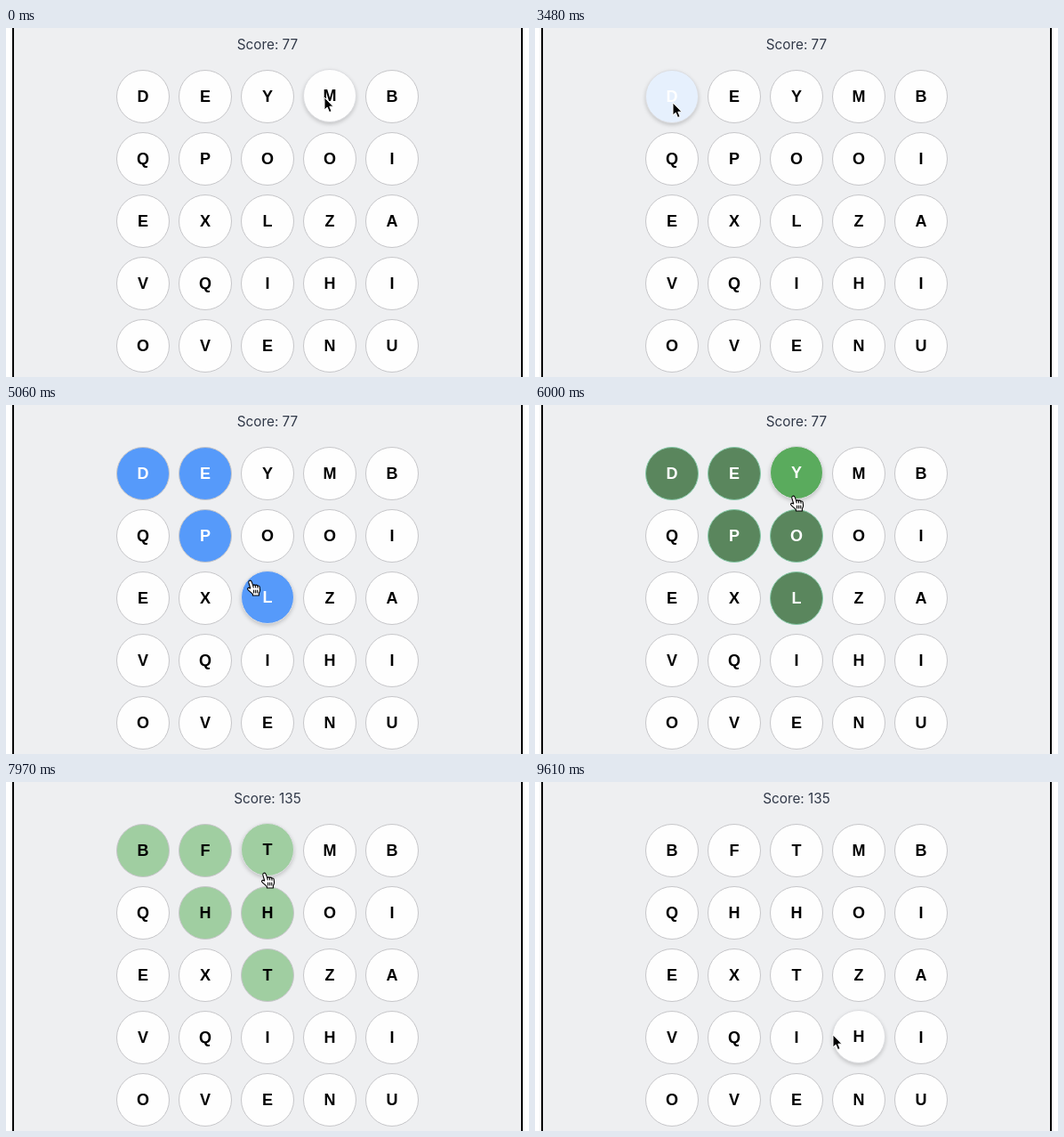
Animation, 588 px wide and 392 px high, one loop 9.73 s. Source, as an HTML page:

```html
<!DOCTYPE html>
<html lang="en">
<head>
<meta charset="utf-8">
<title>Letter grid</title>
<style>
  html, body { margin: 0; width: 100%; height: 100%; overflow: hidden; background: #fff; }
  svg { display: block; width: 588px; height: 392px; }
  .score { font: 15.3px Inter, sans-serif; fill: #303848; text-anchor: middle; }
  .cell text { font: bold 18px "Liberation Sans", Arial, sans-serif; text-anchor: middle; }
  .cell circle { stroke: #c6c6c9; }
  .hover circle { stroke: #dcdde0; filter: drop-shadow(0 2px 2px rgba(0, 0, 0, .18)); }
  .turning circle { stroke: #86c9a8; }
</style>
</head>
<body>
<svg viewBox="0 0 588 392">
  <rect x="8" y="-2" width="572" height="396" fill="#eeeff1" stroke="#000" stroke-width="2"/>
  <text class="score" id="score" x="294" y="24"></text>
  <g id="grid"></g>
  <g id="cursor">
    <path id="arrow" d="M0 0V14L3.2 11.1L5.5 16.6L8.1 15.5L5.8 10.2H10Z"
      fill="#000" stroke="#fff" stroke-linejoin="round"/>
    <g id="hand" stroke="#000" stroke-width="1.1" stroke-linejoin="round" stroke-linecap="round">
      <path fill="#fff" d="M-.3 9L-2.2 2.4Q-2.5.6-1 .2Q.6-.1 1.2 1.6L2.7 5.6Q4 4.3 5.2 5.5Q6.8 4.6 7.8 6.1
        Q9.6 5.5 10.2 7.4L10.6 11Q10.4 13 9.4 14.4V17H2.4V15.4L-2.4 11.2Q-4.2 9.4-3 8.6Q-1.8 7.9-.3 9Z"/>
      <path fill="none" d="M2.7 5.6L3.2 8M5.2 5.5L5.6 8M7.8 6.1L8 8.3M3.6 11V14M5.7 11V14M7.8 11V14"/>
    </g>
  </g>
</svg>
<script>
const LOOP = 9730, DRAG = 3560, PACE = 470, FOUND = 5880, SWAP = 7580, HAND_END = 8720;
const BEFORE = 'DEYMBQPOOIEXLZAVQIHIOVENU';
const AFTER = 'BFTMBQHHOIEXTZAVQIHIOVENU';
const WORD = [0, 1, 6, 12, 7, 2];

const WHITE = [254, 254, 254], BLUE = [86, 154, 250], DARK = [90, 134, 93], GREEN = [90, 171, 93];

const linear = p => p;
const smooth = p => p * p * (3 - 2 * p);
const center = i => [154 + i % 5 * 70, 77 + Math.floor(i / 5) * 70];
const rgb = c => `rgb(${c.map(Math.round)})`;
const byId = id => document.getElementById(id);

// Runs through moves { at, span, to }, each leading on from the one before.
function follow(from, moves, t, ease) {
  return moves.reduce((value, { at, span, to }) => {
    const p = ease(Math.min(1, Math.max(0, (t - at) / span)));
    return value.map((v, k) => v + (to[k] - v) * p);
  }, from);
}
const move = (at, end, ...to) => ({ at, span: end - at, to });

// While dragging, the pointer stops just inside the near rim of each next letter.
const drag = WORD.slice(1).map((cell, k) => {
  const [x, y] = center(cell), [fx, fy] = center(WORD[k]);
  const reach = 25 / Math.hypot(fx - x, fy - y);
  const at = DRAG + k * PACE;
  return move(at, at + PACE, x + (fx - x) * reach - 3, y + (fy - y) * reach);
});

const route = [
  move(60, 330, 236, 152), move(1360, 1610, 228, 152), move(1820, 2060, 277, 204),
  move(2300, 2450, 253, 170), move(2670, 3300, 155, 84),
  ...drag,
  move(8580, 9360, 338, 281), move(9520, 9610, 335, 284)
];

function add(tag, parent, attrs) {
  const el = document.createElementNS('http://www.w3.org/2000/svg', tag);
  for (const k in attrs) el.setAttribute(k, attrs[k]);
  return parent.appendChild(el);
}

const cells = [...BEFORE].map((letter, i) => {
  const [x, y] = center(i), order = WORD.indexOf(i);
  const group = add('g', byId('grid'), {});
  const disc = add('circle', group, { cx: x, cy: y, r: 29.5 });
  const label = add('text', group, { x, y: y + 6.2 });
  const picked = order < 0 ? Infinity : DRAG - 100 + order * PACE;
  const newest = order === WORD.length - 1;
  const fades = order < 0 ? [] : [
    move(picked, picked + 150, ...BLUE),
    move(FOUND, FOUND + 120, ...(newest ? GREEN : DARK)),
    move(FOUND + 120, FOUND + 510, ...GREEN),
    move(SWAP, SWAP + 920, ...WHITE)
  ];
  return { i, x, y, group, disc, label, picked, newest, fades };
});

function render(t) {
  const [px, py] = follow([358, 78], route, t, smooth);
  const pressing = t > DRAG - 160 && t < DRAG;
  const swapped = t >= SWAP;
  const turning = t > FOUND && t < FOUND + 510;

  for (const c of cells) {
    const hover = Math.hypot(px - c.x, py - c.y) < 30;
    const lit = t >= c.picked && !swapped;
    c.group.setAttribute('class',
      'cell' + (hover ? ' hover' : '') + (lit && turning && !c.newest ? ' turning' : ''));
    c.group.setAttribute('transform', `translate(0 ${hover && !pressing ? -1 : 0})`);
    c.disc.setAttribute('fill', rgb(follow(WHITE, c.fades, t, linear)));
    c.label.setAttribute('fill', lit ? '#fff' : '#000');
    c.label.textContent = (swapped ? AFTER : BEFORE)[c.i];
  }

  byId('score').textContent = 'Score: ' + (swapped ? 135 : 77);
  const hand = t >= DRAG && t < HAND_END;
  byId('hand').style.display = hand ? '' : 'none';
  byId('arrow').style.display = hand ? 'none' : '';
  byId('cursor').setAttribute('transform', `translate(${Math.round(px)} ${Math.round(py)})`);
}

const begin = performance.now();
function tick() {
  render((performance.now() - begin) % LOOP);
  requestAnimationFrame(tick);
}
tick();
</script>
</body>
</html>
```
